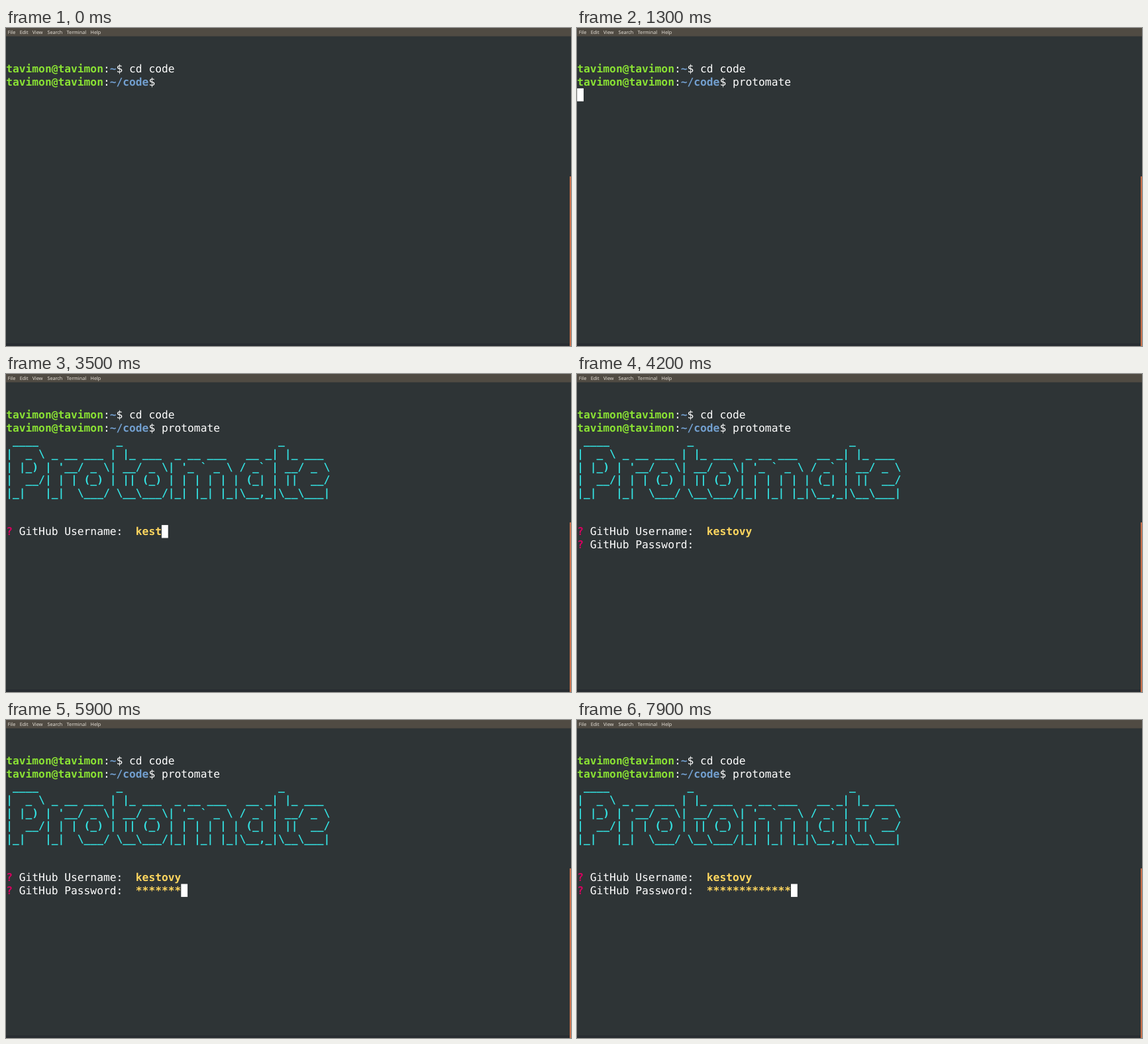
An HTML page that plays this animation: 853 px wide and 480 px high, repeating every 8 s.

```html
<!DOCTYPE html>
<html lang="en">
<head>
<meta charset="utf-8">
<title>Terminal</title>
<style>
  html, body { margin: 0; width: 100%; height: 100%; overflow: hidden; background: #2e3436; }
  svg { display: block; width: 853px; height: 480px; }
  text { white-space: pre; text-rendering: geometricPrecision; }
  .mono { font: 16.25px "DejaVu Sans Mono", monospace; fill: #fff; }
  .bold { font-weight: bold; }
  .menu { font: 7.2px "Noto Sans", "Open Sans", sans-serif; fill: #e4dfd6; }
</style>
</head>
<body>
<svg id="stage" viewBox="0 0 853 480"></svg>
<script>
const LOOP = 8000;
const CELL = 9.782, ROW = 19.55, TOP = 52, BASE = 15.3;
const GREEN = "#8ae234", BLUE = "#729fcf", CYAN = "#34e2e2", RED = "#d7005f", YELLOW = "#ffd75f";
const HOST = "tavimon@tavimon", USER = "kestovy", COMMAND = "protomate";

const BANNER = String.raw`
 ____            _                        _
|  _ \ _ __ ___ | |_ ___  _ __ ___   __ _| |_ ___
| |_) | '__/ _ \| __/ _ \| '_ ${"`"} _ \ / _${"`"} | __/ _ \
|  __/| | | (_) | || (_) | | | | | | (_| | ||  __/
|_|   |_|  \___/ \__\___/|_| |_| |_|\__,_|\__\___|`.split("\n").slice(1);

// [time, number of characters entered]
const commandKeys = [[100, 1], [200, 2], [300, 3], [400, 4], [500, 5], [900, 7], [1100, 8], [1200, 9]];
const userKeys = [[2900, 1], [3000, 2], [3300, 3], [3500, 4], [3600, 5], [3700, 6], [3800, 7]];
const passKeys = [[4900, 1], [5200, 2], [5300, 3], [5400, 4], [5500, 5], [5800, 6], [5900, 7],
  [6100, 8], [6200, 9], [6500, 10], [7000, 11], [7700, 12], [7900, 13]];
// spans in which the cursor is not drawn
const hidden = [[0, 100], [1900, 2600], [4200, 4300], [7600, 7700]];

const stage = document.getElementById("stage");

function add(tag, attrs, parent = stage, content = "") {
  const el = document.createElementNS("http://www.w3.org/2000/svg", tag);
  for (const key in attrs) el.setAttribute(key, attrs[key]);
  el.textContent = content;
  parent.appendChild(el);
  return el;
}

function rect(x, y, width, height, fill) {
  return add("rect", { x, y, width, height, fill });
}

function write(col, row, content, color, parent = stage) {
  const el = add("text", {
    x: 0.2 + col * CELL,
    y: TOP + row * ROW + BASE,
    class: color ? "mono bold" : "mono"
  }, parent, content);
  if (color) el.style.fill = color;
  return el;
}

function prompt(row, path) {
  write(0, row, HOST, GREEN);
  write(15, row, ":");
  write(16, row, path, BLUE);
  write(16 + path.length, row, "$");
}

function question(row, label) {
  const group = add("g", {});
  write(0, row, "?", RED, group);
  write(2, row, label, "", group);
  return group;
}

rect(0, 0, 853, 480, "#2e3436");
rect(0, 0, 853, 12.5, "#504b43");
rect(0, 476, 853, 4, "#282d31");
rect(851, 224, 2, 256, "#c9704a");
[["File", 2.7], ["Edit", 20.7], ["View", 39.8], ["Search", 62.5], ["Terminal", 91.6], ["Help", 127.6]]
  .forEach(([name, x]) => add("text", { x, y: 9, class: "menu" }, stage, name));

prompt(0, "~");
write(19, 0, "cd code");
prompt(1, "~/code");

const command = write(24, 1, "");
const banner = add("g", {});
BANNER.forEach((line, i) => write(0, 2 + i, line, CYAN, banner));
const askUser = question(9, "GitHub Username:");
const askPass = question(10, "GitHub Password:");
const user = write(20, 9, "", YELLOW);
const pass = write(20, 10, "", YELLOW);
const cursor = rect(0, 0, CELL, ROW, "#fff");

function typed(keys, t) {
  let count = 0;
  for (const [time, n] of keys) if (t >= time) count = n;
  return count;
}

function show(el, on) {
  el.style.display = on ? "" : "none";
}

function cursorCell(t, counts) {
  if (t < 1300) return [24 + counts[0], 1];
  if (t < 1700) return [0, 2];
  if (t < 1800) return [0, 9];
  if (t < 4200) return [20 + counts[1], 9];
  return [20 + counts[2], 10];
}

function draw(t) {
  const counts = [commandKeys, userKeys, passKeys].map(keys => typed(keys, t));
  command.textContent = COMMAND.slice(0, counts[0]);
  user.textContent = USER.slice(0, counts[1]);
  pass.textContent = "*".repeat(counts[2]);
  show(banner, t >= 1700);
  show(askUser, t >= 1800);
  show(askPass, t >= 4200);

  const [col, row] = cursorCell(t, counts);
  cursor.setAttribute("x", 0.2 + col * CELL);
  cursor.setAttribute("y", TOP + row * ROW);
  show(cursor, !hidden.some(([from, to]) => t >= from && t < to));
}

const start = performance.now();
function tick() {
  draw((performance.now() - start) % LOOP);
  requestAnimationFrame(tick);
}
tick();
</script>
</body>
</html>
```
